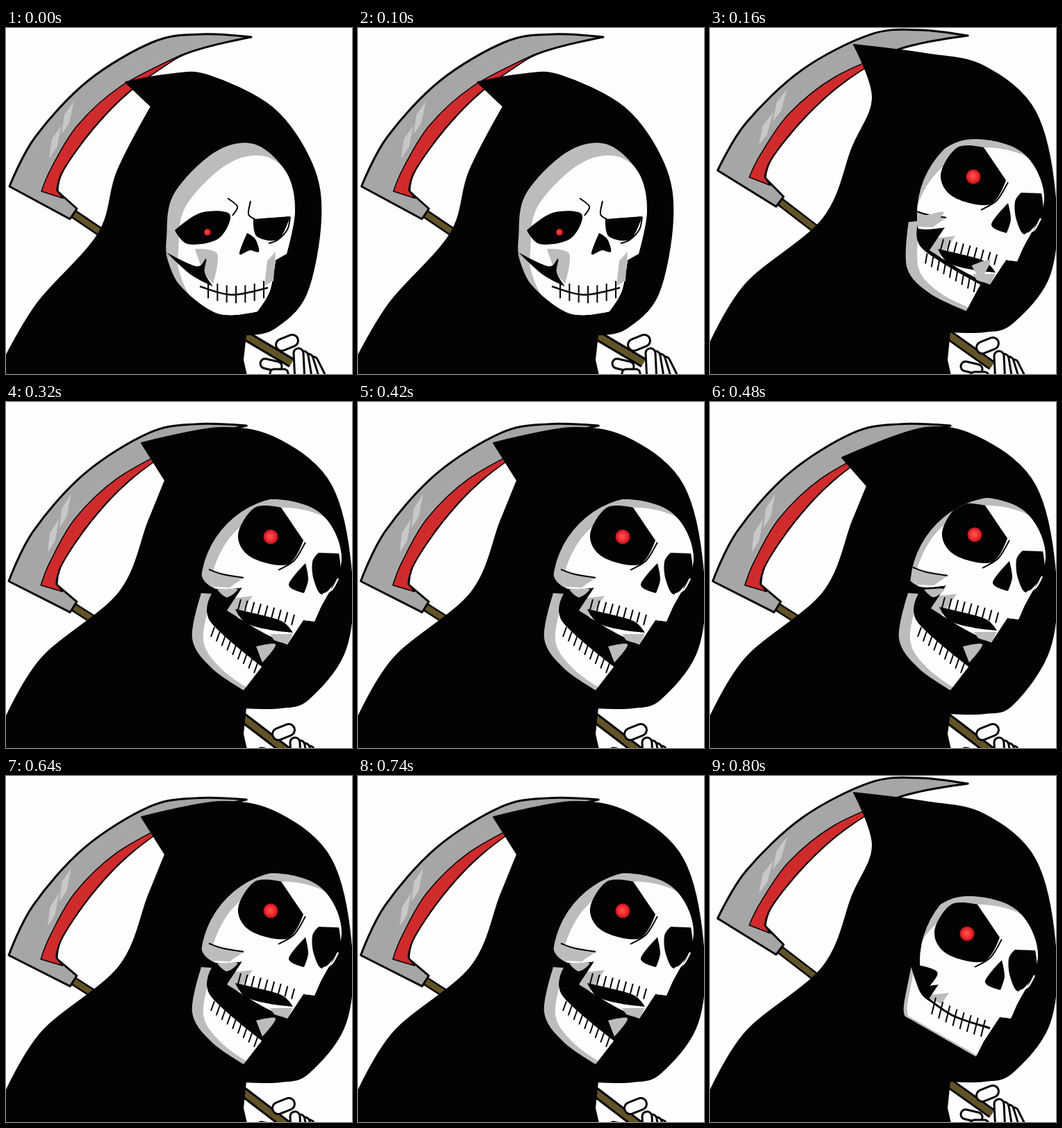
Animation, 498 px wide and 498 px high, one loop 960 ms. Source, as an HTML page with a canvas:

```html
<!DOCTYPE html>
<html lang="en">
<head>
<meta charset="utf-8">
<title>Laughing reaper</title>
<style>
html, body { margin: 0; width: 100%; height: 100%; overflow: hidden; background: #fdfefd; }
canvas { display: block; width: 498px; height: 498px; }
</style>
</head>
<body>
<canvas id="stage" width="498" height="498"></canvas>
<script>
const ctx = document.getElementById('stage').getContext('2d');
const BLACK = '#030204', WHITE = '#fdfdfd', BONE = '#bcbcbc', STEEL = '#a6a6a6';
const SHINE = '#c8c8c8', BLOOD = '#cf2b2c', WOOD = '#625327';
const HOLD = 160;

// Smooth curve through "x,y" points; a trailing "!" marks a sharp corner.
function trace(text, closed) {
  const pts = text.trim().split(/\s+/).map(s => {
    const [x, y] = s.replace('!', '').split(',').map(Number);
    return { x, y, sharp: s.endsWith('!') };
  });
  const n = pts.length;
  const at = i => closed ? pts[(i + n) % n] : pts[Math.max(0, Math.min(n - 1, i))];
  const pull = (i, axis) => at(i).sharp ? 0 : (at(i + 1)[axis] - at(i - 1)[axis]) / 6;
  ctx.beginPath();
  ctx.moveTo(pts[0].x, pts[0].y);
  for (let i = 0; i < (closed ? n : n - 1); i++) {
    const p = at(i), q = at(i + 1);
    ctx.bezierCurveTo(p.x + pull(i, 'x'), p.y + pull(i, 'y'),
      q.x - pull(i + 1, 'x'), q.y - pull(i + 1, 'y'), q.x, q.y);
  }
  if (closed) ctx.closePath();
}

function stroke(color, width) {
  ctx.strokeStyle = color;
  ctx.lineWidth = width;
  ctx.stroke();
}

function fill(color, text, outline) {
  trace(text, true);
  ctx.fillStyle = color;
  ctx.fill();
  if (outline) stroke(BLACK, outline);
}

function line(text, width = 2, color = BLACK) {
  trace(text, false);
  stroke(color, width);
}

function group(x, y, angle, paint) {
  ctx.save();
  ctx.translate(x, y);
  ctx.rotate(angle * Math.PI / 180);
  paint();
  ctx.restore();
}

// Bone lit from the right: a white copy of the shape, shifted inside itself.
function shaded(text, dx, dy) {
  ctx.save();
  fill(BONE, text);
  ctx.clip();
  ctx.translate(dx, dy);
  fill(WHITE, text);
  ctx.restore();
}

function teeth(x0, y0, x1, y1, count, dx, dy, sag = 0) {
  for (let i = 0; i < count; i++) {
    const t = i / (count - 1);
    const x = x0 + (x1 - x0) * t;
    const y = y0 + (y1 - y0) * t + sag * 4 * t * (1 - t);
    line(`${x},${y} ${x + dx},${y + dy}`);
  }
}

function pupil(x, y, r) {
  const glow = ctx.createRadialGradient(x - 1, y - 1, 0, x, y, r);
  glow.addColorStop(0, '#ff5a58');
  glow.addColorStop(0.6, '#f02c30');
  glow.addColorStop(1, '#b3151b');
  ctx.fillStyle = glow;
  ctx.beginPath();
  ctx.arc(x, y, r, 0, Math.PI * 2);
  ctx.fill();
}

function knuckle(text, width) {
  ctx.lineCap = 'round';
  line(text, width);
  line(text, width - 6, WHITE);
  ctx.lineCap = 'butt';
}

// The blade swings about its outer heel.
function scythe({ angle, dx, dy }) {
  group(5 + dx, 228 + dy, angle, () => {
    ctx.translate(-5, -228);
    line('92,264 160,310', 13);
    line('92,264 160,310', 8, WOOD);
    fill(STEEL, `5,228! 42,157 118,76 212,20 280,9 353,13! 254,39 178,91 125,145
      82,205 74,235! 102,260! 92,275!`, 3);
    fill(BLOOD, '51,235! 66,200 103,140 165,84 254,38! 178,91 125,145 82,205 73,234! 82,245!', 1.5);
    for (const [x, y] of [[62, 188], [80, 153]]) {
      fill(SHINE, `${x},${y}! ${x + 4},${y - 28}! ${x + 18},${y - 48}! ${x + 11},${y - 16}!`);
    }
  });
}

function hand({ x, y, gripY }) {
  const pole = `330,${gripY} ${411 + x},${482 + y}`;
  line(pole, 15);
  line(pole, 9, WOOD);
  group(x, y, 0, () => {
    for (let i = 3; i >= 0; i--) {
      knuckle(`${421 + 7 * i},${468 + 4 * i} ${423 + 11 * i},508`, 17);
    }
    knuckle('397,456 412,450', 20);
    knuckle('373,483 390,487', 17);
    knuckle('386,497 400,497', 15);
  });
}

function scowl() {
  shaded(`231,303 241,240 300,179 357,167 403,207 416,262 404,325! 388,334!
    380,378 362,408! 305,411 250,370 231,327!`, 17, 18);
  fill(BONE, '388,322! 385,364! 372,371! 376,335!');
  fill(BONE, '272,318! 304,325 298,368! 284,350');
  fill(BLACK, '243,291! 280,266 322,268 306,303 262,311');
  pupil(290, 294, 5);
  fill(BLACK, '356,275! 409,271! 392,304 361,300');
  line('409,272 405,290 391,305 378,310');
  line('319,245 333,257 326,270');
  line('352,249 349,268 358,275');
  fill(BLACK, '347,295! 336,325 351,320 364,322 359,304');
  fill(BLACK, '231,323! 274,343 288,332 286,352 298,372! 266,355');
  line('279,372 325,384 377,374', 2.5);
  teeth(291, 364, 371, 364, 7, 0, 25, 7);
}

// The hood hides whatever falls left of a circle around `hoodX`.
function cranium({ x, y, hoodX }, open) {
  ctx.save();
  ctx.beginPath();
  ctx.arc(hoodX, 268, 132, 0, Math.PI * 2);
  ctx.clip();
  ctx.translate(x, y);
  shaded(`281,241 310,180 370,141 450,158 483,225 451,300 444,316! 428,314!
    405,349! 365,329 318,300! 340,267! 300,268`, 15, 12);
  fill(BLACK, '334,191 358,152 396,152! 428,199! 405,234 352,223');
  line('431,202 415,228 392,242');
  pupil(381, 194, 10.5);
  fill(BLACK, '441,230 450,217! 479,218! 480,248 456,277 443,256');
  line('456,277 469,270 478,254', 2.5, WHITE);
  fill(BLACK, '431,232! 407,263 429,275! 435,255');
  if (open) {
    fill(BONE, '292,242! 342,253! 322,267! 298,266!');
    line('292,241 312,248 342,253');
    fill(BLACK, '330,298! 365,306 398,316 413,332! 380,328 345,318');
    fill(BONE, '380,334! 413,334! 405,349! 386,343!');
    teeth(334, 299, 411, 321, 9, 4, -15, -2);
  }
  ctx.restore();
}

function openJaw({ x, y, angle }) {
  group(288 + x, 277 + y, angle, () => {
    ctx.translate(-288, -277);
    fill(BONE, '304,270! 333,269 318,281');
    fill(BONE, '360,352! 388,349 369,375!');
    shaded('281,275! 296,276! 294,316 368,381! 342,415! 295,382 268,340', 16, 3);
    teeth(300, 324, 362, 376, 9, -5, 14);
  });
}

const laugh = (head, jaw) => () => {
  cranium(head, true);
  openJaw(jaw);
};

function smirk() {
  cranium({ x: -11, y: 33, hoodX: 434 }, false);
  shaded('290,273! 279,330 281,346! 383,404! 410,350! 345,332 310,318! 302,290', 5, 0);
  fill(BLACK, '288,270! 327,282 312,310 320,326! 303,312');
  line('309,317 350,345 403,363', 3);
  teeth(325, 319, 396, 351, 8, -6, 24, 3);
}

const hem = '341,478! 346,500! -2,500!';
const upright = `172,78! 235,67 290,68 384,115 440,195 453,275 432,383 385,433 345,441!
  ${hem} -2,476! 46,395 133,296 160,207 209,113!`;
const leaning = (tip, notch, chin) => `${tip}! 310,37 394,55 468,120 497,245 489,355
  436,${chin - 13} 395,${chin} 345,${chin}! ${hem} -2,458! 52,368 163,274 205,172 ${notch}`;

const mid = { angle: 0, dx: 0, dy: 0 };
const high = { angle: 3.4, dx: 6, dy: -23 };
const low = { angle: -1.5, dx: -1, dy: 30 };
const raised = { x: -5, y: 4, gripY: 432 };
const sunk = { x: -5, y: 22, gripY: 446 };

const still = { blade: mid, grip: { x: 0, y: 0, gripY: 434 }, cloak: upright, face: scowl };
const rise = {
  blade: high, grip: raised, cloak: leaning('207,24', '234,100', 437),
  face: laugh({ x: -2, y: 20, hoodX: 430 }, { x: 5, y: 3, angle: -9.5 })
};
const bend = {
  blade: low, grip: sunk, cloak: leaning('195,59', '229,113!', 440),
  face: laugh({ x: 0, y: 0, hoodX: 412 }, { x: 0, y: 0, angle: 0 })
};
const deep = {
  blade: low, grip: sunk, cloak: leaning('190,80', '226,121!', 448),
  face: laugh({ x: 0, y: -3, hoodX: 420 }, { x: 4, y: 0, angle: 0 })
};
const settle = { ...rise, cloak: leaning('207,24', '234,100', 439), face: smirk };

const cycle = [still, rise, bend, deep, bend, settle];

function draw(ms) {
  const pose = cycle[Math.floor(ms / HOLD) % cycle.length];
  ctx.fillStyle = '#fdfefd';
  ctx.fillRect(0, 0, 498, 498);
  ctx.lineJoin = 'round';
  scythe(pose.blade);
  hand(pose.grip);
  fill(BLACK, pose.cloak, 2);
  pose.face();
}

const start = performance.now();
function tick() {
  draw(performance.now() - start);
  requestAnimationFrame(tick);
}
tick();
</script>
</body>
</html>
```
